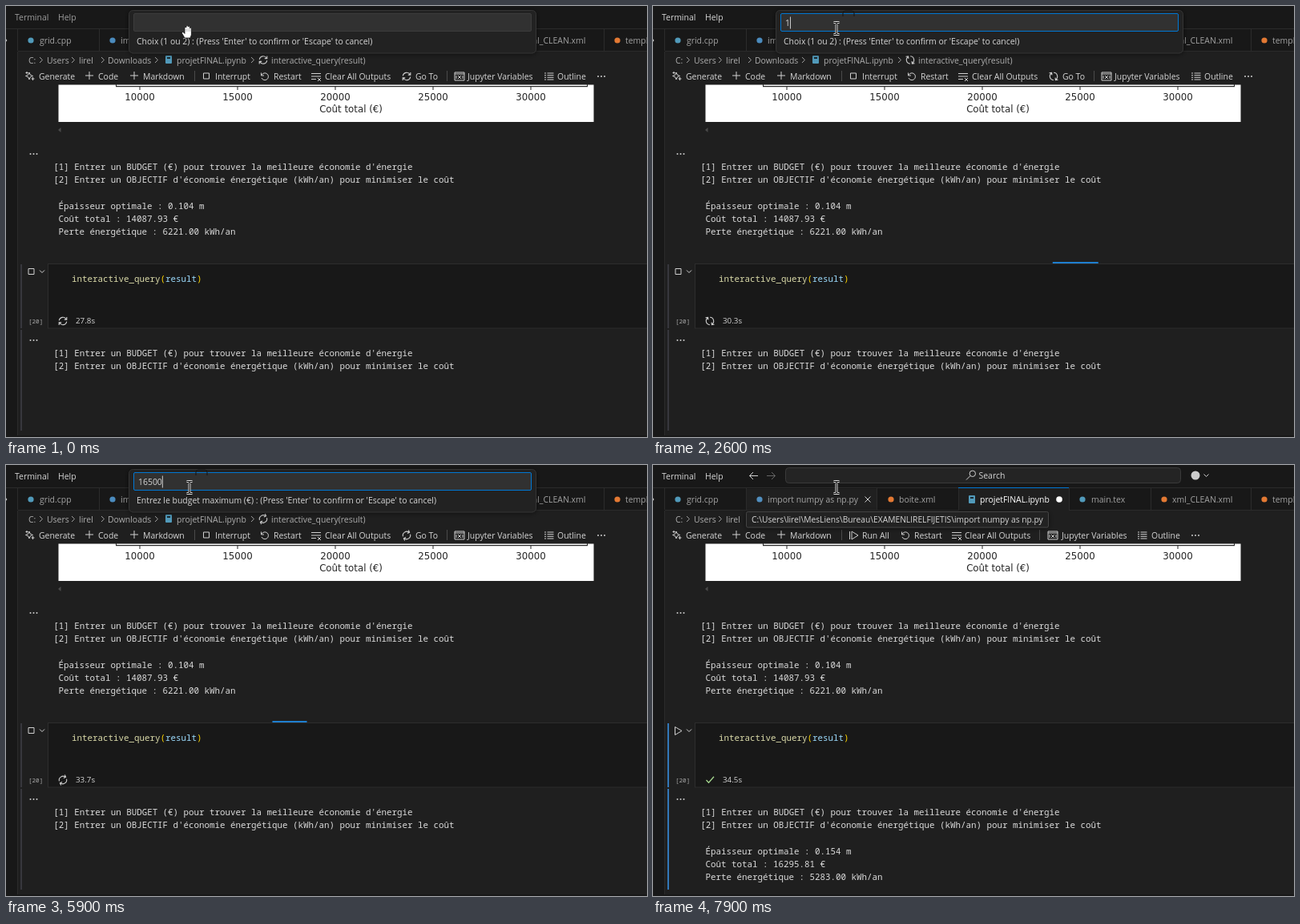
Animation, 800 px wide and 539 px high, one loop 8000 ms. Source, as an HTML page:

```html
<!DOCTYPE html>
<html lang="fr">
<head>
<meta charset="utf-8">
<title>Notebook query</title>
<style>
  html, body { margin: 0; width: 100%; height: 100%; overflow: hidden; background: #181818; }
  svg { display: block; width: 800px; height: 539px; }
  text { font-family: "Open Sans", "Noto Sans", sans-serif; font-size: 10.45px; fill: #d6d6d6; white-space: pre; }
  .mono { font-family: "Noto Sans Mono", "DejaVu Sans Mono", monospace; font-size: 10.83px; font-weight: 500; fill: #dcdcdc; }
  .plot { font-family: "DejaVu Sans", sans-serif; font-size: 11.8px; fill: #262626; text-anchor: middle; }
  .tab { fill: #a2a2a2; }
  .crumb { fill: #adadad; }
  .icon { fill: none; stroke: #d0d0d0; stroke-width: 1px; }
</style>
</head>
<body>
<svg id="stage" viewBox="0 0 800 539" xmlns="http://www.w3.org/2000/svg"></svg>
<script>
const LOOP = 8000, FOCUS = 700, CHOICE = 2300, SECOND = 3400, DONE = 6800, HOVER = 7300;
const KEYS = [4700, 4950, 5200, 5450, 5750];
const BLINK = 530;
const USER = 'lirel';
const TIP = `C:\\Users\\${USER}\\MesLiens\\Bureau\\EXAMENLIRELFIJETIS\\import numpy as np.py`;
const HINT = " (Press 'Enter' to confirm or 'Escape' to cancel)";

const esc = s => s.replace(/&/g, '&amp;').replace(/</g, '&lt;');
const text = (x, y, s, cls = '', extra = '') => `<text x="${x}" y="${y}" class="${cls}" ${extra}>${esc(s)}</text>`;
const rect = (x, y, w, h, fill, extra = '') => `<rect x="${x}" y="${y}" width="${w}" height="${h}" fill="${fill}" ${extra}/>`;
const path = (d, style = '') => `<path class="icon" d="${d}" style="${style}"/>`;
const dot = (x, y, r, fill) => `<circle cx="${x}" cy="${y}" r="${r}" fill="${fill}"/>`;
const group = (id, body) => `<g id="${id}">${body}</g>`;
const mono = (x, y, s) => text(x, y, s, 'mono');
const dots = (x, y) => [-4, 0, 4].map(d => dot(x + d, y, 1, '#ccc')).join('');
const plus = (x, y) => path(`M${x - 5} ${y}h10M${x} ${y - 5}v10`);
const arrow = (x, y) => path(`M${x - 2} ${y - 3.5}l3.5 3.5l-3.5 3.5`, 'stroke:#a0a0a0');
const chevron = (x, y) => path(`M${x - 3} ${y - 1.5}l3 3l3-3`);
const divider = x => rect(x, 81, 1, 13, '#4a4a4a');
const sync = (x, y) => `<g transform="translate(${x} ${y})"><g class="spin">` +
  path('M-4.7-.6A4.8 4.8 0 0 1 4.3-2.1M4.7.6A4.8 4.8 0 0 1-4.3 2.1M4.8-5v3.1H1.8M-4.8 5V1.9h3', 'stroke-width:1.1px') + '</g></g>';
const restart = (x, y) => path(`M${x - 4.5} ${y - 4.5}v3.5h3.5M${x - 4} ${y - 1.5}a4.4 4.4 0 1 1 0 3.5`);
const clear = (x, y) => path(`M${x - 6} ${y - 3.5}h12M${x - 6} ${y}h12M${x - 6} ${y + 3.5}h6M${x + 2} ${y + 2}l4 4m0-4l-4 4`);
const vars = (x, y) => path(`M${x - 6} ${y - 5}h12v10h-12zM${x - 6} ${y - 3}h12M${x - 4} ${y - 1}v4M${x + 4} ${y - 1}v4M${x - 2} ${y - 1}l4 4m0-4l-4 4`);
const outline = (x, y) => path([-4, -1.3, 1.3, 4].map(d => `M${x - 6} ${y + d}h2M${x - 2.5} ${y + d}h8`).join(''));
const book = (x, y) => rect(x - 4, y - 5, 8, 10, '#519aba', 'rx="1"') + rect(x - 2, y - 3, 4, 2, '#1b2b33');

function result(y, thickness, cost, loss) {
  return mono(65.5, y, `Épaisseur optimale : ${thickness} m`) +
    mono(65.5, y + 16, `Coût total : ${cost} €`) +
    mono(65.5, y + 32, `Perte énergétique : ${loss} kWh/an`);
}

function menu(y) {
  return dots(34.5, y - 20) +
    mono(59.2, y, "[1] Entrer un BUDGET (€) pour trouver la meilleure économie d'énergie") +
    mono(59.2, y + 15.8, "[2] Entrer un OBJECTIF d'économie énergétique (kWh/an) pour minimiser le coût");
}

function tabs() {
  const orange = '#e37933', blue = '#519aba';
  const list = [[31, 42, 'grid.cpp', blue], [133, 143, 'import numpy as np.py', '#4b8bbe'],
    [297, 307, 'boite.xml', orange], [536, 547, 'main.tex', blue],
    [638, 648, 'xml_CLEAN.xml', orange], [763, 773, 'template.xml', orange]];
  return rect(0, 28, 800, 1, '#2b2b2b') + rect(15, 56, 800, 1, '#2b2b2b') +
    [14, 116, 279, 381, 519, 621, 746].map(x => rect(x, 29, 1, 27, '#2b2b2b')).join('') +
    rect(382, 29, 137, 28, '#1f1f1f') + rect(381, 28, 138, 1, '#0078d4') +
    list.map(([ix, x, s, c]) => dot(ix, 43, 3.6, c) + text(x, 47, s, 'tab')).join('') +
    book(398, 43) + text(408, 47, 'projetFINAL.ipynb', '', 'style="fill:#fff"') + dot(507, 43, 3.8, '#fff');
}

function breadcrumbs() {
  const parts = [[28, 'C:'], [51, 'Users'], [91, USER], [127, 'Downloads'],
    [213, 'projetFINAL.ipynb'], [331, 'interactive_query(result)']];
  return parts.map(([x, s]) => text(x, 72, s, 'crumb')).join('') +
    [44, 84, 121, 188, 308].map(x => arrow(x, 67.5)).join('') + book(203, 67) + sync(321, 67.5);
}

function toolbar() {
  const y = 88, label = (x, s) => text(x, 92, s);
  const common = path('M29 83l1.3 3.2l3.2 1.3l-3.2 1.3l-1.3 3.2l-1.3-3.2l-3.2-1.3l3.2-1.3zM33.5 89v4M31.5 91h4M26 82v3M24.5 83.5h3') +
    label(41, 'Generate') + plus(104, 87) + label(115, 'Code') + plus(160, 87) + label(171, 'Markdown') + divider(235);
  const busy = path('M246.5 84h7v7h-7z') + label(261, 'Interrupt') + restart(323, y) + label(334, 'Restart') +
    clear(387, y) + label(398, 'Clear All Outputs') + sync(500, y) + label(511, 'Go To') + divider(550) +
    vars(566, y) + label(576, 'Jupyter Variables') + outline(678, y) + label(688, 'Outline') + dots(743, y);
  const idle = path('M245.5 83v10M248 83l8 5l-8 5z') + label(261, 'Run All') + restart(315, y) + label(326, 'Restart') +
    clear(379, y) + label(389, 'Clear All Outputs') + divider(482) + vars(499, y) + label(510, 'Jupyter Variables') +
    outline(611, y) + label(622, 'Outline') + dots(677, y);
  return common + group('busyTools', busy) + group('idleTools', idle);
}

function chart() {
  const ticks = [0, 1, 2, 3, 4].map(i => {
    const x = 167 + 122 * i;
    return rect(x - .5, 101, 1, 4, '#262626') + text(x, 117.5, String(10000 + 5000 * i), 'plot');
  }).join('');
  return rect(65.5, 98.5, 668, 46.5, '#fff') + rect(137, 100, 589, 1.2, '#262626') +
    rect(137, 98, 1, 3, '#262626') + rect(725, 98, 1, 3, '#262626') + ticks + text(430.5, 133.2, 'Coût total (€)', 'plot') +
    '<path d="M68.5 152v6l-3.5-3z" fill="#4a4a4a"/>';
}

function cell() {
  const code = `<text x="82" y="345" class="mono"><tspan fill="#dcdcaa">interactive_query</tspan>` +
    `<tspan fill="#ffd700">(</tspan><tspan fill="#9cdcfe">result</tspan><tspan fill="#ffd700">)</tspan></text>`;
  return rect(18, 323, 2, 80, '#37373d', 'class="rail"') + rect(18, 405, 2, 126, '#37373d', 'class="rail"') +
    rect(52.5, 322.5, 760, 80.5, '#181818', 'stroke="#2d2d2d"') + code + chevron(45, 332) +
    text(28, 397, '[20]', 'mono', 'style="font-size:7.6px;fill:#aaa"') +
    text(87, 397, '', '', 'id="timer" style="font-size:9.8px"') +
    group('busyCell', path('M28 328.5h7v7h-7z') + sync(71, 394)) +
    group('idleCell', path('M27.5 327.5v10l8.5-5z') + path('M66.5 394l3 3.2l6.5-7.5', 'stroke:#a5d68f;stroke-width:1.3px')) +
    rect(0, 320, 0, 2, '#1f7fcf', 'id="progress"');
}

function titleBar() {
  return text(11, 18, 'Terminal', 'top') + text(65, 18, 'Help', 'top') + group('search',
    path('M131 13.5h-10.5m4.5-4.5l-4.5 4.5l4.5 4.5') +
    path('M142 13.5h10.5m-4.5-4.5l4.5 4.5l-4.5 4.5', 'stroke:#666') +
    rect(165.5, 3.5, 493, 19, '#242424', 'rx="4" stroke="#3a3a3a"') +
    path('M402.5 10.8a3.7 3.7 0 1 1-7.4 0a3.7 3.7 0 1 1 7.4 0M396 13.5l-5 5') + text(406.5, 17, 'Search') +
    dot(677, 13, 5.5, '#ccc') + chevron(690.5, 13));
}

function dialog() {
  return group('dialog', rect(153.5, 5.5, 508, 53.5, '#222', 'rx="5" stroke="#343434" filter="url(#shadow)"') +
    rect(159.5, 9.5, 496, 22, '#313131', 'id="field" rx="1.5"') +
    path('M237 13v-4q0-3 3-3h8q3 0 3 3v4', 'stroke:#151515').replace('<path', '<path id="smudge"') +
    text(165, 25, '', '', 'id="entry"') + rect(165, 13.5, 1, 15, '#ccc', 'id="caret"') +
    text(163, 48, '', '', 'id="prompt"'));
}

const beam = 'M225.5 20.5h2.500l1 1l1-1h2.500M229 21.500v13M225.500 35.500h2.500l1-1l1 1h2.500';
const hand = 'M-4 8l-3.500-6q-.5-2 1.500-1.500l2 2v-7.500q1-2 2 0v-2q1.200-1.600 2.200 0v1q1.200-1.500 2.200 0v1.500q1.300-1.200 2 .5v8l-1.400 4z';

const stage = document.getElementById('stage');
stage.innerHTML =
  '<defs><filter id="shadow" x="-5%" y="-30%" width="110%" height="170%"><feDropShadow dx="0" dy="1" stdDeviation="3" flood-color="#000" flood-opacity=".5"/></filter></defs>' +
  rect(0, 0, 800, 539, '#181818') + rect(15, 57, 785, 480, '#1f1f1f') + rect(14, 57, 1, 480, '#2b2b2b') +
  titleBar() + tabs() + path('M-1.5 40l2.5 3l-2.5 3') +
  group('tabHover', rect(117, 30, 162, 26, '#fff', 'opacity=".035"') + path('M264.5 39.5l7 7m0-7l-7 7')) +
  breadcrumbs() + toolbar() + chart() + menu(205) + result(253.5, '0.104', '14087.93', '6221.00') +
  cell() + menu(438) + group('answer', result(486.5, '0.154', '16295.81', '5283.00')) + dialog() +
  group('tip', rect(116.5, 58.5, 377, 19.5, '#202020', 'rx="2" stroke="#454545" filter="url(#shadow)"') +
    text(123, 72, TIP, '', 'style="font-size:10.25px"')) +
  group('beam', path(beam, 'stroke:#e0e0e0;stroke-width:3px') + path(beam, 'stroke:#000;stroke-width:1.1px')) +
  group('hand', `<path d="${hand}" fill="#fff" stroke="#111" stroke-width=".8"/>` +
    path('M-1.9 0v-4M.3 0v-4M2.5 0v-4', 'stroke:#777;stroke-width:.5px'));

const el = id => document.getElementById(id);
const show = (id, on) => el(id).setAttribute('visibility', on ? 'visible' : 'hidden');
const set = (node, attrs) => Object.entries(attrs).forEach(([k, v]) => node.setAttribute(k, v));
const spinners = stage.querySelectorAll('.spin');
const rails = stage.querySelectorAll('.rail');
const titles = stage.querySelectorAll('.top');

function drawProgress(t) {
  const start = 53, width = 990;
  const p = (t / 4000 - .1812 + 1) % 1;
  const size = width * .02 * (3 - 4 * Math.abs(p - .5));
  const shift = p < .5 ? p * width : width * (.5 + (p - .5) * .96);
  set(el('progress'), { x: start + width * .01 + shift - size / 2, width: size });
}

function drawInput(t) {
  const focused = t >= FOCUS;
  const typed = t < SECOND ? (t >= CHOICE ? '1' : '') : '16500'.slice(0, KEYS.filter(k => k <= t).length);
  const lastEvent = [FOCUS, CHOICE, SECOND, ...KEYS].filter(k => k <= t).pop();
  el('entry').textContent = typed;
  el('prompt').textContent = (t < SECOND ? 'Choix (1 ou 2) :' : 'Entrez le budget maximum (€) :') + HINT;
  set(el('field'), { stroke: focused ? '#0078d4' : '#3c3c3c' });
  set(el('caret'), { x: 165 + (typed ? el('entry').getComputedTextLength() : 0) });
  el('caret').style.opacity = focused && Math.floor((t - lastEvent) / BLINK) % 2 === 0 ? 1 : 0;
  el('smudge').style.opacity = focused ? 1 : 0;
}

function render(t) {
  const done = t >= DONE;
  const seconds = 27.75 + t / 1000 + .03 * Math.cos(t / 5000 * 2 * Math.PI);
  el('timer').textContent = (done ? '34.5' : seconds.toFixed(1)) + 's';
  ['busyTools', 'busyCell', 'dialog', 'progress'].forEach(id => show(id, !done));
  ['idleTools', 'idleCell', 'search', 'answer'].forEach(id => show(id, done));
  show('tabHover', t >= HOVER - 300);
  el('tip').style.opacity = Math.min(1, Math.max(0, (t - HOVER + 50) / 100));

  const angle = Math.floor(t / 50) * 12;
  spinners.forEach(s => set(s, { transform: `rotate(${angle})` }));
  rails.forEach(r => set(r, { fill: done ? '#3277b8' : '#37373d' }));
  titles.forEach(s => { s.style.fill = t >= FOCUS ? '#d6d6d6' : '#9d9d9d'; });
  drawProgress(t);
  drawInput(t);

  const move = Math.min(1, Math.max(0, (t - 200) / 300));
  show('hand', t < 500);
  show('beam', t >= 500);
  set(el('hand'), { transform: `translate(${227 + 2 * move} ${32 - 5 * move})` });
}

function frame(now) {
  render(now % LOOP);
  requestAnimationFrame(frame);
}
render(0);
requestAnimationFrame(frame);
</script>
</body>
</html>
```
